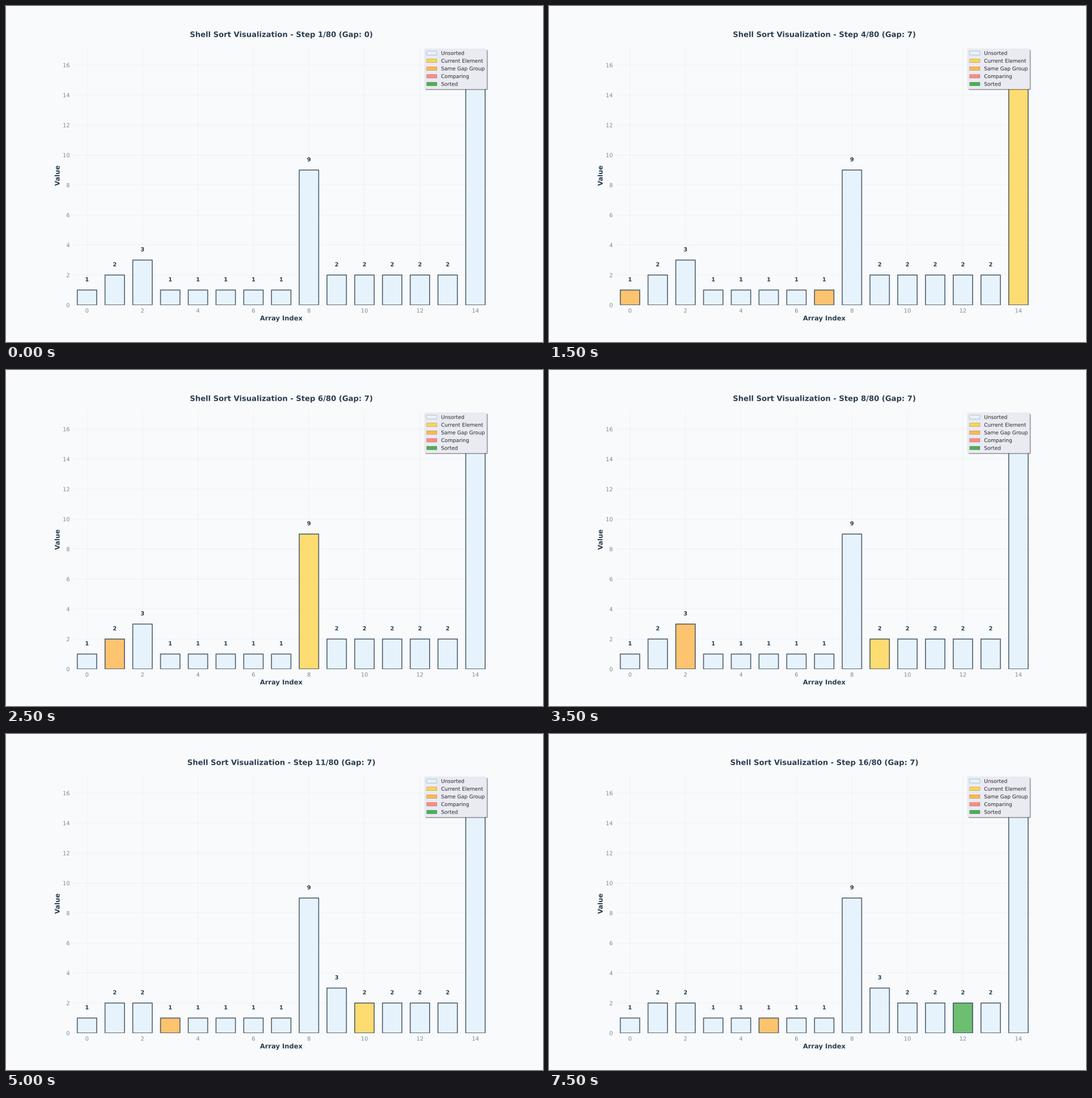
Animation of 947 by 592 pixels, one loop 8 s. Source, as a matplotlib script:

```python
import matplotlib.pyplot as plt
from matplotlib.animation import FuncAnimation
from matplotlib.patches import Patch
from matplotlib.patheffects import Normal

# Text drawn as outlines and unsnapped paths keep sub-pixel positions.
plt.rcParams.update({
    "font.family": "DejaVu Sans",
    "text.hinting": "none",
    "path.snap": False,
    "path.effects": [Normal()],
    "patch.linewidth": 0.3,
})

WIDTH, HEIGHT = 947, 592
DPI = WIDTH / 16
SHOWN, INTERVAL = 16, 500

VALUES = [1, 2, 3, 1, 1, 1, 1, 1, 9, 2, 2, 2, 2, 2, 15]
BACKGROUND, INK, MUTED = "#f8fafc", "#2c3e50", "#7f8c8d"
COLORS = {
    "Unsorted": "#e3f2fd",
    "Current Element": "#ffd54f",
    "Same Gap Group": "#ffb74d",
    "Comparing": "#ff8a80",
    "Sorted": "#4caf50",
}


def shell_sort_steps(values):
    """Return (values, gap, state per bar) for every step of the sort."""
    arr, n = list(values), len(values)
    steps = []

    def record(gap, group, state, marked):
        states = ["Unsorted"] * n
        for k in group:
            states[k] = "Same Gap Group"
        for k in marked:
            states[k] = state
        steps.append((arr[:], gap, states))

    record(0, [], "Unsorted", [])
    gap = n // 2
    while gap:
        for start in range(gap):
            group = range(start, n, gap)
            for i in group[1:]:
                item, j = arr[i], i
                record(gap, group, "Current Element", [i])
                while j >= gap and arr[j - gap] > item:
                    record(gap, group, "Comparing", [j - gap, j])
                    arr[j], arr[j - gap] = arr[j - gap], item
                    j -= gap
                record(gap, group, "Sorted", [j])
        gap //= 2
    record(0, [], "Sorted", range(n))
    return steps


steps = shell_sort_steps(VALUES)

fig, ax = plt.subplots(figsize=(16, HEIGHT / DPI), dpi=DPI, facecolor=BACKGROUND)
fig.subplots_adjust(left=0.125, right=0.9, bottom=0.11, top=0.88)
ax.set_facecolor(BACKGROUND)
ax.set_axisbelow(True)
ax.set_xlim(-0.5, len(VALUES) - 0.5)
ax.set_ylim(0, max(VALUES) * 1.15)
ax.set_xticks(range(0, 15, 2))
ax.set_yticks(range(0, 17, 2))
ax.tick_params(length=0, pad=7, labelsize=12, labelcolor=MUTED)
ax.grid(color="#e0e0e0", alpha=0.4, linewidth=1)
ax.spines[:].set_visible(False)
ax.set_xlabel("Array Index", fontsize=14, fontweight="bold", color=INK)
ax.set_ylabel("Value", fontsize=14, fontweight="bold", color=INK)
title = ax.set_title("", fontsize=16, fontweight="bold", color=INK, pad=20)

bars = ax.bar(range(len(VALUES)), VALUES, width=0.7, edgecolor=INK,
              linewidth=2, alpha=0.8)
labels = [ax.text(i, 0, "", ha="center", va="bottom", fontsize=12,
                  fontweight="bold", color=INK) for i in range(len(VALUES))]

ax.legend(handles=[Patch(facecolor=c, edgecolor=INK, label=name)
                   for name, c in COLORS.items()],
          loc="upper right", fontsize=11, labelcolor="0.15", frameon=True,
          labelspacing=0.54, borderpad=0.42, fancybox=True, shadow=True,
          framealpha=1, facecolor="#eaeaf2", edgecolor="0.8")


def draw(frame):
    values, gap, states = steps[frame]
    for bar, label, value, state in zip(bars, labels, values, states):
        bar.set_height(value)
        bar.set_facecolor(COLORS[state])
        label.set_y(value + 0.5)
        label.set_text(str(value))
    title.set_text(f"Shell Sort Visualization - Step {frame + 1}/{len(steps)} (Gap: {gap})")
    return [*bars, *labels, title]


anim = FuncAnimation(fig, draw, frames=SHOWN, interval=INTERVAL,
                     init_func=lambda: draw(0), repeat=True, repeat_delay=0)
plt.show()
```
